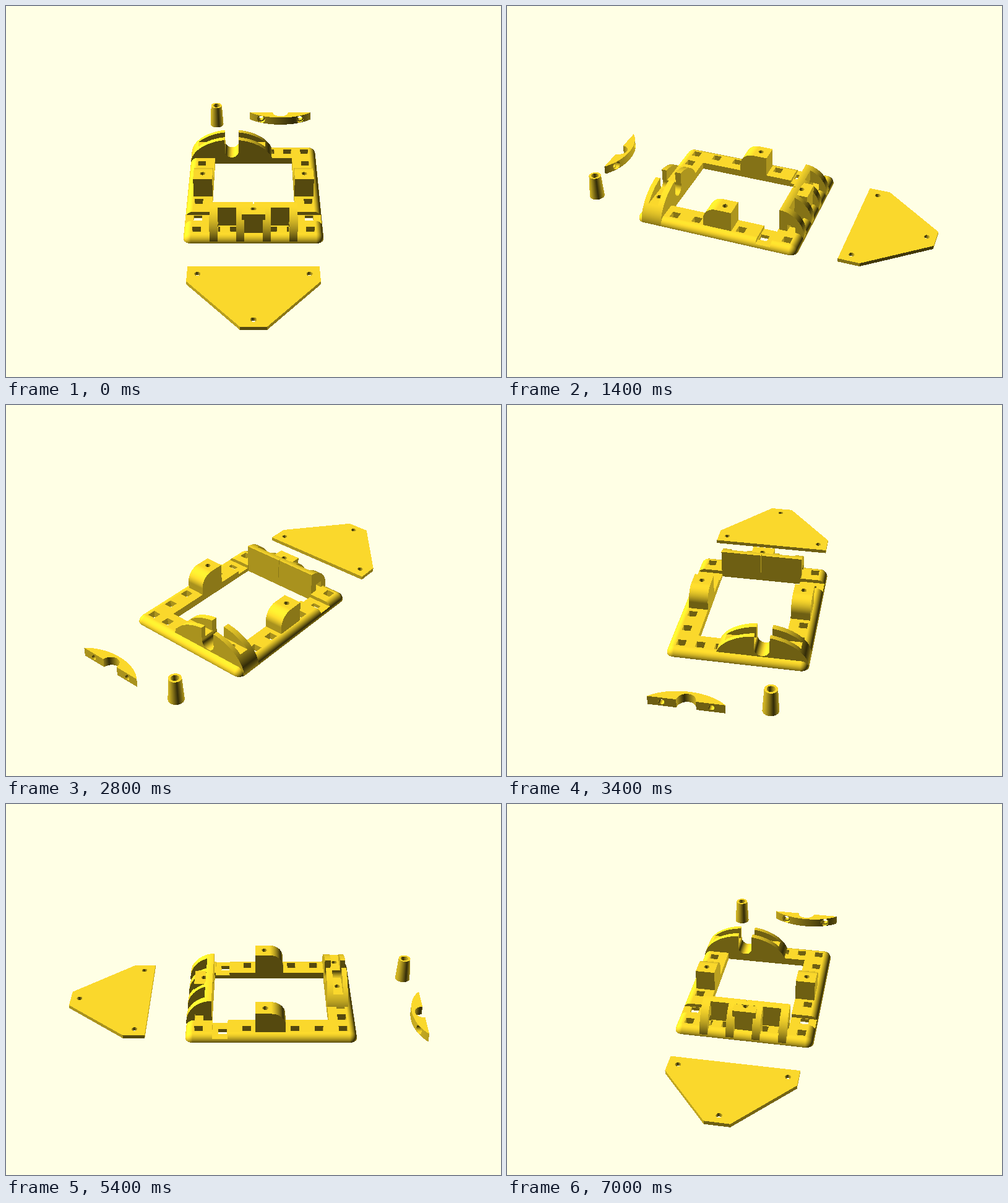
An HTML page with a canvas that plays this animation: 800x600 px, repeating every 7.2 s.

```html
<!DOCTYPE html>
<html>
<head>
<meta charset="utf-8">
<style>
html, body { margin: 0; width: 100%; height: 100%; overflow: hidden; background: #ffffe5; }
canvas { display: block; width: 800px; height: 600px; }
</style>
</head>
<body>
<canvas id="stage" width="800" height="600"></canvas>
<script>
const W = 800, H = 600, STEPS = 36, STEP_MS = 200;
const ctx = document.getElementById('stage').getContext('2d');

// Camera: distance, focal length in pixels, elevation, height of the pivot
const DIST = 500, FOCAL = 300 / Math.tan(Math.PI / 16), PIVOT = 7.85;
const ELEV = 35 * Math.PI / 180, S = Math.sin(ELEV), C = Math.cos(ELEV);
const YELLOW = [249, 215, 44];

// Half axes of the ellipse shared by the saddle and its clamp
const ARC_W = 23.6, ARC_H = 16.2;

// Solids: a bounding box, optionally cut by planes and by one quadric
const box = (x0, x1, y0, y1, z0, z1) => ({ lo: [x0, y0, z0], hi: [x1, y1, z1] });

function rod(axis, c, r, from, to) {
  const lo = c.map(v => v - r), hi = c.map(v => v + r), q = [1, 1, 1];
  lo[axis] = from; hi[axis] = to; q[axis] = 0;
  return { lo, hi, c, q, k: r * r };
}

function ball(c, r) {
  return { lo: c.map(v => v - r), hi: c.map(v => v + r), c, q: [1, 1, 1], k: r * r };
}

function clip(s, axis, lo, hi) {
  s.lo[axis] = Math.max(s.lo[axis], lo);
  s.hi[axis] = Math.min(s.hi[axis], hi);
  return s;
}

// Box bounded by an ellipse: ARC_W along x, ARC_H along the given axis
function oval(bounds, c, axis) {
  const q = [1 / (ARC_W * ARC_W), 0, 0];
  q[axis] = 1 / (ARC_H * ARC_H);
  return Object.assign(bounds, { c, q, k: 1 });
}

const both = make => [make(-1), make(1)];
const screw = (x, y, top, bottom) => rod(2, [x, y, 0], 1.5, bottom, top + 0.05);

function frame() {
  const add = [box(-32, 32, -31, 49, 0, 4)];
  for (const y of [-31, 49]) {
    add.push(clip(rod(0, [0, y, 0], 4, -32, 32), 2, 0, 4));
    for (const x of [-32, 32]) add.push(clip(ball([x, y, 0], 4), 2, 0, 4));
  }
  for (const x of [-32, 32]) add.push(clip(rod(1, [x, 0, 0], 4, -31, 49), 2, 0, 4));

  const cut = [
    box(-22, 22, -21.6, 39.05, -0.1, 4.1),
    box(-36, 36, -21.2, -13.3, 2, 4.05)
  ];
  for (let i = -3; i <= 3; i++) for (let j = 0; j < 7; j++) {
    if (Math.abs(i) < 3 && j > 0 && j < 6) continue;
    const x = i * 9.75, y = -28.2 + j * 12.36;
    cut.push(box(x - 2.25, x + 2.25, y - 2.25, y + 2.25, -0.05, 4.05));
  }
  return { add, cut };
}

function post(side) {
  const a = side < 0 ? -32.2 : 22, b = a + 10.2;
  return {
    add: [
      box(a, b, 0.95, 9, 0, 15.4),
      box(a, b, 0.95, 16.4, 0, 8),
      clip(rod(0, [0, 9, 8], 7.4, a, b), 1, 9, 17)
    ],
    cut: [screw(side * 27.25, 6, 15.4, 4)]
  };
}

function holder() {
  const arch = (a, b, from) =>
    clip(clip(rod(0, [0, -21.3, 2.7], 13.6, a, b), 1, from, -21.6), 2, 0, 20);
  const add = [arch(-22.4, 22.4, -25.3), box(-6, 6, -31.2, -21.6, 0, 15.6)];
  for (const x of [-22.4, -8.8, 4.7, 18.3]) add.push(arch(x, x + 4.1, -36));
  const cut = both(m => box(m < 0 ? -22.5 : 17, m < 0 ? -17 : 22.5, -30.4, -26, 4, 8));
  cut.push(screw(0, -26.2, 15.6, 4), box(-0.2, 0.2, -22.8, -21.5, 5, 16.5));
  return { add, cut };
}

function saddle() {
  const x = -12.4;
  const disc = (y0, y1, z0) =>
    oval(box(x - ARC_W, x + ARC_W, y0, y1, z0, ARC_H), [x, 0, 0], 2);
  return {
    add: [disc(39, 50, 0)],
    cut: [
      disc(42.2, 47.4, 9.5),
      box(x - 3.9, x + 3.9, 38.9, 50.1, 8.3, 18),
      rod(1, [x, 0, 8.3], 3.9, 38.9, 50.1),
      ...both(m => screw(x + m * 11.7, 44.8, 9.6, 2))
    ]
  };
}

function clamp() {
  const x = 16.55, chord = 89.1;
  const across = (m, r, to) => rod(1, [x + m * 11.9, 0, 2.5], r, 82, to);
  return {
    add: [oval(box(x - 18.9, x + 18.9, 82, chord, 0, 5), [x, chord + 9.9, 0], 1)],
    cut: [
      rod(2, [x, chord, 0], 4.7, -0.05, 5.05),
      ...both(m => across(m, 1.5, chord + 0.1)),
      ...both(m => across(m, 2.4, 86.5))
    ]
  };
}

function cone() {
  const x = -22.4, y = 83.4, apex = 65.5;
  const body = box(x - 4, x + 4, y - 4, y + 4, 0, 13.1);
  Object.assign(body, { c: [x, y, apex], q: [1, 1, -Math.pow(4 / apex, 2)], k: 0 });
  return { add: [body], cut: [rod(2, [x, y, 0], 2.05, -0.05, 13.15)] };
}

function plate() {
  const w = 32.4, tipW = 6.2, back = -55.7, side = -66.9, tip = -98.5;
  const body = box(-w, w, tip, back, 0, 2);
  const nx = side - tip, ny = w - tipW, len = Math.hypot(nx, ny);
  body.planes = both(m => ({
    n: [m * nx / len, -ny / len, 0],
    k: (nx * w - ny * side) / len
  }));
  const hole = (x, y) => rod(2, [x, y, 0], 1.5, -0.05, 2.05);
  return { add: [body], cut: [hole(-27.25, -61.4), hole(27.25, -61.4), hole(0, -93.8)] };
}

const parts = [frame(), ...both(post), holder(), saddle(), clamp(), cone(), plate()];

// Ray against one solid: entry and exit with the face met at each (3 = quadric, 4+ = plane)
let tIn, tOut, faceIn, faceOut;
function cross(s, o, d) {
  tIn = -1e9; tOut = 1e9;
  for (let i = 0; i < 3; i++) {
    let a = (s.lo[i] - o[i]) / d[i], b = (s.hi[i] - o[i]) / d[i];
    if (a > b) { const m = a; a = b; b = m; }
    if (a > tIn) { tIn = a; faceIn = i; }
    if (b < tOut) { tOut = b; faceOut = i; }
  }
  if (tIn >= tOut) return false;
  if (s.planes) for (let i = 0; i < s.planes.length; i++) {
    const { n, k } = s.planes[i];
    const den = n[0] * d[0] + n[1] * d[1];
    const t = (k - n[0] * o[0] - n[1] * o[1]) / den;
    if (den < 0) { if (t > tIn) { tIn = t; faceIn = 4 + i; } }
    else if (t < tOut) { tOut = t; faceOut = 4 + i; }
  }
  if (s.q) {
    let a = 0, b = 0, c = -s.k;
    for (let i = 0; i < 3; i++) {
      const e = o[i] - s.c[i], q = s.q[i];
      a += q * d[i] * d[i]; b += q * e * d[i]; c += q * e * e;
    }
    const disc = b * b - a * c;
    if (disc <= 0) return false;
    const r = Math.sqrt(disc), t0 = (-b - r) / a, t1 = (-b + r) / a;
    if (t0 > tIn) { tIn = t0; faceIn = 3; }
    if (t1 < tOut) { tOut = t1; faceOut = 3; }
  }
  return tIn < tOut;
}

function shade(s, face, t, o, d, light) {
  let dot;
  if (face < 3) dot = light[face];
  else if (face > 3) {
    const n = s.planes[face - 4].n;
    dot = n[0] * light[0] + n[1] * light[1];
  } else {
    let sum = 0, len = 0;
    for (let i = 0; i < 3; i++) {
      const n = s.q[i] * (o[i] + t * d[i] - s.c[i]);
      sum += n * light[i]; len += n * n;
    }
    dot = sum / Math.sqrt(len);
  }
  return 0.2 + Math.abs(dot);
}

// Screen rectangle around a solid
function bounds(s, cos, sin) {
  let x0 = W, x1 = 0, y0 = H, y1 = 0;
  for (let i = 0; i < 8; i++) {
    const x = i & 1 ? s.hi[0] : s.lo[0], y = i & 2 ? s.hi[1] : s.lo[1];
    const z = (i & 4 ? s.hi[2] : s.lo[2]) - PIVOT;
    const X = x * cos - y * sin, Y = x * sin + y * cos;
    const k = FOCAL / (DIST + Y * C - z * S);
    const px = W / 2 + X * k, py = H / 2 - (z * C + Y * S) * k;
    x0 = Math.min(x0, px); x1 = Math.max(x1, px);
    y0 = Math.min(y0, py); y1 = Math.max(y1, py);
  }
  s.x0 = Math.max(0, Math.floor(x0)); s.x1 = Math.min(W - 1, Math.ceil(x1));
  s.y0 = Math.max(0, Math.floor(y0)); s.y1 = Math.min(H - 1, Math.ceil(y1));
}

function render(step) {
  const angle = step / STEPS * 2 * Math.PI, cos = Math.cos(angle), sin = Math.sin(angle);
  const img = ctx.createImageData(W, H), pix = img.data;
  const depth = new Float32Array(W * H).fill(1e9);
  new Uint32Array(pix.buffer).fill(0xffe5ffff);

  // Turn a view-space vector into model space
  const turn = (x, y, z) => [x * cos + y * sin, y * cos - x * sin, z];
  const o = turn(0, -DIST * C, DIST * S);
  o[2] += PIVOT;
  const light = turn(-1, S - C, C + S).map(v => v / Math.sqrt(3));
  const d = [0, 0, 0];
  function aim(px, py) {
    const u = (px + 0.5 - W / 2) / FOCAL, v = (H / 2 - py - 0.5) / FOCAL;
    const y = v * S + C;
    d[0] = u * cos + y * sin; d[1] = y * cos - u * sin; d[2] = v * C - S;
  }

  for (const { add, cut } of parts) {
    for (const s of cut) bounds(s, cos, sin);
    for (const s of add) {
      bounds(s, cos, sin);
      for (let py = s.y0; py <= s.y1; py++) {
        const row = cut.filter(n => py >= n.y0 && py <= n.y1);
        for (let px = s.x0; px <= s.x1; px++) {
          aim(px, py);
          if (!cross(s, o, d)) continue;
          const i = py * W + px, end = tOut;
          let t = tIn, face = faceIn, owner = s, moved = true;
          if (t >= depth[i]) continue;
          // Step through every cut that covers the current point
          while (moved && t < end) {
            moved = false;
            for (const n of row) {
              if (px < n.x0 || px > n.x1 || !cross(n, o, d)) continue;
              if (tIn <= t + 1e-4 && tOut > t + 1e-4) {
                t = tOut; face = faceOut; owner = n; moved = true;
              }
            }
          }
          if (t >= end - 1e-4 || t >= depth[i]) continue;
          depth[i] = t;
          const k = shade(owner, face, t, o, d, light);
          for (let c = 0; c < 3; c++) pix[i * 4 + c] = YELLOW[c] * k;
        }
      }
    }
  }
  return img;
}

const cache = [];
let shown = -1;
function draw(now) {
  const step = Math.floor(now / STEP_MS) % STEPS;
  if (step !== shown) {
    cache[step] = cache[step] || render(step);
    ctx.putImageData(cache[step], 0, 0);
    shown = step;
  }
}

let start = null;
function tick(now) {
  if (start === null) start = now;
  draw(Math.max(0, now - start));
  requestAnimationFrame(tick);
}
draw(0);
requestAnimationFrame(tick);
</script>
</body>
</html>
```
